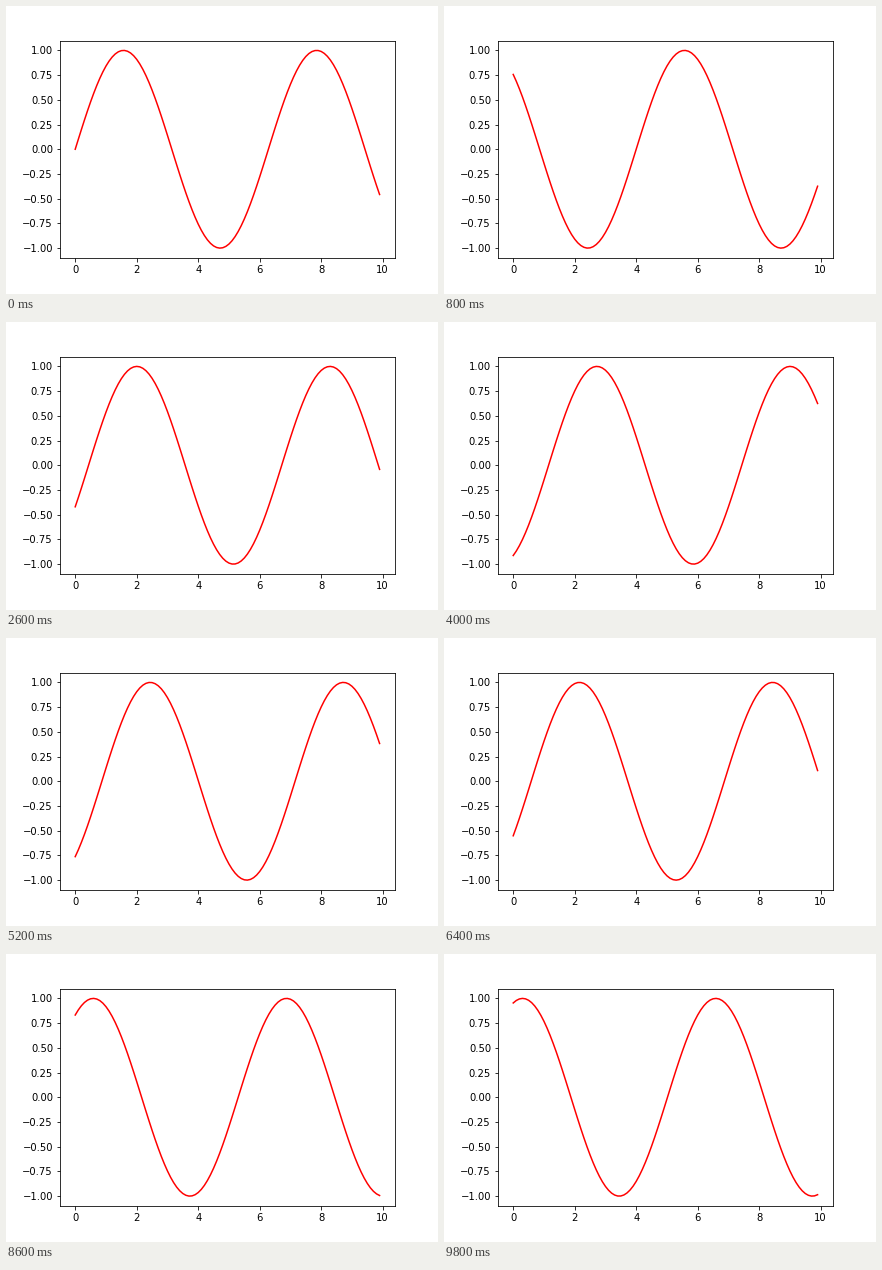
These frames come from a looping animation (432 by 288 pixels, 10 s). A matplotlib script:

```python
import numpy as np
import matplotlib.pyplot as plt
from matplotlib.animation import FuncAnimation

FRAMES = 50
INTERVAL = 200  # ms

fig, ax = plt.subplots(figsize=(6, 4), dpi=72)
fig.subplots_adjust(left=0.125, right=0.9, bottom=0.125, top=0.88)

x = np.arange(0, 10, 0.1)
line, = ax.plot(x, np.sin(x), color="red", linewidth=1.5)


def update(i):
    """Shift the wave right by one radian per step."""
    line.set_ydata(np.sin(x - i))
    return line,


def init():
    return update(0)


anim = FuncAnimation(fig, update, frames=FRAMES, init_func=init,
                     interval=INTERVAL, repeat=True, repeat_delay=0)
plt.show()
```
